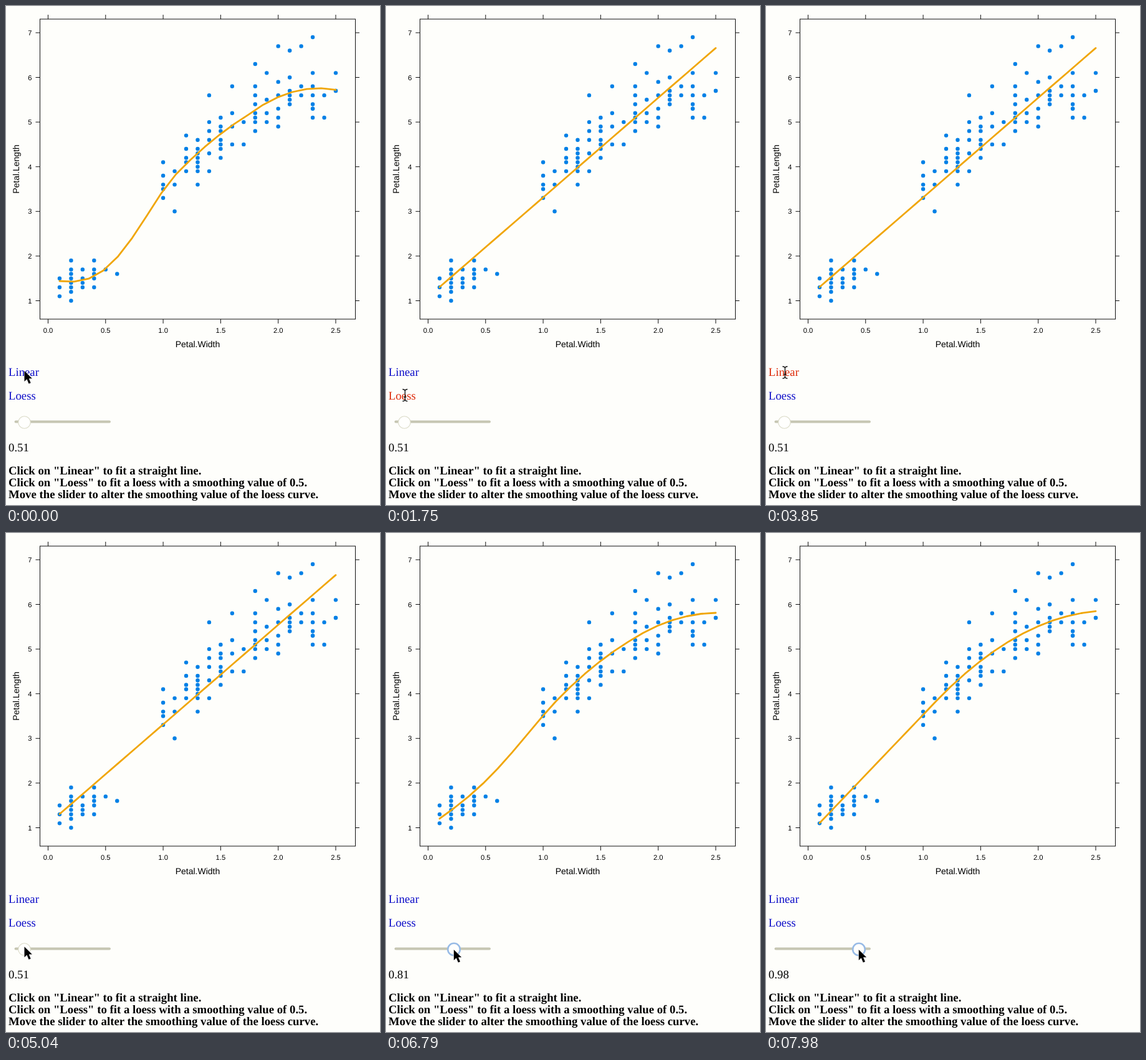
Write an HTML page that moves like this. It is 600 by 800 pixels and loops after 8 s.

```html
<!DOCTYPE html>
<html lang="en">
<head>
<meta charset="utf-8">
<title>Curve fitting</title>
<style>
html, body { margin: 0; width: 100%; height: 100%; overflow: hidden; background: #fefefb; }
svg { display: block; width: 100vw; height: 100vh; text-rendering: geometricPrecision; }
.sans { font-family: "Liberation Sans", Arial, sans-serif; }
.serif { font-family: "Liberation Serif", Times, serif; font-size: 18.75px; }
.tick { font-size: 11.2px; }
.title { font-size: 14px; text-anchor: middle; }
.bold { font-weight: bold; }
</style>
</head>
<body>
<svg id="stage" viewBox="0 0 600 800"></svg>
<script>
const LOOP = 8000, STEP = 70;
const stage = document.getElementById('stage');

function set(el, attrs) {
  for (const k in attrs) el.setAttribute(k, attrs[k]);
}
function add(tag, attrs, text) {
  const el = document.createElementNS('http://www.w3.org/2000/svg', tag);
  set(el, attrs);
  if (text !== undefined) el.textContent = text;
  return stage.appendChild(el);
}

const px = w => 67.5 + 184.6 * w;
const py = l => 544.1 - 71.6 * l;

const line = w => 1.0836 + 2.2299 * w;

// Rises straight, then levels off; a smaller span bends both ends more
function loess(w, span) {
  const bend = Math.pow(Math.max(0, 0.98 - span) / 0.47, 1.2);
  const left = Math.min(1, (w - 0.1) / 1.01);
  const right = Math.max(0, (w - 1.74) / 0.76);
  const smooth = 0.836 + 2.694 * w - 0.879 * Math.max(0, w - 1.1) ** 2;
  const dip = (1 - left) ** 2 * (0.335 - 2.3 * left - 4.47 * left * left);
  const hump = right * (0.28 - 0.405 * right);
  return smooth + bend * (dip + hump);
}

function curve(f) {
  const points = Array.from({ length: 20 }, (_, i) => {
    const w = 0.1 + 2.4 * i / 19;
    return px(w).toFixed(1) + ' ' + py(f(w)).toFixed(1);
  });
  return 'M' + points.join('L');
}

// Plot frame, ticks and labels
add('rect', { x: 54.5, y: 21, width: 506, height: 481, fill: 'none', stroke: '#111' });
let ticks = '';
for (let w = 0; w <= 2.5; w += 0.5) {
  const x = px(w);
  ticks += `M${x} 502v7M${x} 21v-7`;
  add('text', { class: 'sans tick', x, y: 523.5, 'text-anchor': 'middle' }, w.toFixed(1));
}
for (let l = 1; l <= 7; l++) {
  const y = py(l);
  ticks += `M54.5 ${y}h-7M560.5 ${y}h6.5`;
  add('text', { class: 'sans tick', x: 41.5, y: y + 4, 'text-anchor': 'end' }, l);
}
add('path', { d: ticks, stroke: '#111' });
add('text', { class: 'sans title', x: 307.5, y: 546.5 }, 'Petal.Width');
add('text', { class: 'sans title', transform: 'translate(20.5 261.5) rotate(-90)' }, 'Petal.Length');

// A column of dots: both ends are fixed, those between lean to the trend
function column(w, low, high, count) {
  for (let i = 0; i < count; i++) {
    const u = count > 1 ? (i / (count - 1)) ** Math.max(1, w * w / 2) : 0;
    const pull = i > 0 && i < count - 1 ? 0.3 : 0;
    const even = low + (high - low) * u;
    const l = even + (loess(w, 0.51) - even) * pull;
    add('circle', { cx: px(w), cy: py(Math.round(l * 10) / 10), r: 3.2, fill: '#0080e6' });
  }
}
// Lowest, highest and count for each tenth of width
const columns = (from, rows) => rows.forEach((row, i) => column(from + i / 10, ...row));
columns(0.1, [[1.1, 1.5, 3], [1, 1.9, 8], [1.3, 1.7, 4], [1.3, 1.9, 5], [1.7, 1.7, 1], [1.6, 1.6, 1]]);
columns(1, [[3.3, 4.1, 5], [3, 3.9, 3], [3.9, 4.7, 5], [3.6, 4.6, 8], [3.9, 5.6, 6], [4.2, 5.1, 7],
  [4.5, 5.8, 4], [4.5, 5, 2], [4.8, 6.3, 8], [5, 6.1, 4], [4.9, 6.7, 6], [5.4, 6.6, 6],
  [5.6, 6.7, 3], [5.1, 6.9, 8], [5.1, 5.6, 2], [5.7, 6.1, 3]]);

const fit = add('path', { fill: 'none', stroke: '#f0a606', 'stroke-width': 2.8,
  'stroke-linecap': 'round', 'stroke-linejoin': 'round' });

// Controls and text
const linearLink = add('text', { class: 'serif', x: 4, y: 593 }, 'Linear');
const loessLink = add('text', { class: 'serif', x: 4, y: 630.5 }, 'Loess');
add('path', { d: 'M15.5 666.5H166', stroke: '#c6c6b2', 'stroke-width': 3.8, 'stroke-linecap': 'round' });
const knob = add('circle', { cy: 667.5, r: 9.8, fill: '#fffffd' });
const readout = add('text', { class: 'serif', x: 4, y: 714 });
['Click on "Linear" to fit a straight line.',
 'Click on "Loess" to fit a loess with a smoothing value of 0.5.',
 'Move the slider to alter the smoothing value of the loess curve.'
].forEach((s, i) => add('text', { class: 'serif bold', x: 4, y: 751 + 19 * i }, s));
const arrow = add('path', { d: 'M0 0V17L4 13.3L7 20.5L10.2 19.2L7.2 12.2H12.4Z',
  fill: '#000', stroke: '#fff', 'paint-order': 'stroke' });
const beam = add('path', { d: 'M-4 -9.5Q0 -9.5 0 -6.5Q0 -9.5 4 -9.5M0 -6.5V6.5M-4 9.5Q0 9.5 0 6.5Q0 9.5 4 9.5M-2 3H2',
  fill: 'none', stroke: '#111', 'stroke-width': 1.4 });

// Keys are [time, value]
function track(keys, t, ease = u => u) {
  const i = keys.findIndex(key => key[0] > t);
  if (i === 0) return keys[0][1];
  if (i < 0) return keys[keys.length - 1][1];
  const [t0, a] = keys[i - 1], [t1, b] = keys[i];
  return a + (b - a) * ease((t - t0) / (t1 - t0));
}
const easeInOut = u => u * u * (3 - 2 * u);

const DRAG = 5320;
const knobKeys = [[DRAG, 29.5], [6020, 60], [6790, 109], [7980, 149]];
const spanKeys = [[DRAG, 0.51], [6020, 0.63], [6790, 0.81], [7980, 0.98]];
const pointerKeys = [[0, 585], [210, 587], [1190, 587], [1610, 624], [2730, 624],
  [3220, 587.5], [4130, 587.5], [4900, 663], [DRAG, 664], [6300, 668]];

const linkColor = hover => hover ? '#dd2a08' : '#0d0dc8';
const shown = on => on ? 'visible' : 'hidden';

function draw(time) {
  const t = Math.floor(time / STEP) * STEP;
  const dragging = t >= DRAG;
  const knobX = track(knobKeys, t);
  const span = Math.round(track(spanKeys, t) * 100) / 100;
  const x = dragging ? knobX + 0.3 : 30;
  const y = track(pointerKeys, t, easeInOut);
  const overLinear = t >= 140 && y > 577 && y < 598;
  const overLoess = y > 614 && y < 635;
  const overText = overLinear || overLoess;
  const straight = (t >= 700 && t < 2100) || (t >= 3500 && span <= 0.51);

  set(fit, { d: curve(straight ? line : w => loess(w, span)) });
  set(linearLink, { fill: linkColor(overLinear) });
  set(loessLink, { fill: linkColor(overLoess) });
  set(knob, { cx: knobX, stroke: dragging ? '#98bbe6' : '#d9d9c6', 'stroke-width': dragging ? 2.6 : 1.1 });
  readout.textContent = span.toFixed(2);
  set(arrow, { transform: `translate(${x - 0.5} ${y})`, visibility: shown(!overText) });
  set(beam, { transform: `translate(${x + 0.5} ${y})`, visibility: shown(overText) });
}

const start = performance.now();
function tick() {
  draw((performance.now() - start) % LOOP);
  requestAnimationFrame(tick);
}
tick();
</script>
</body>
</html>
```
